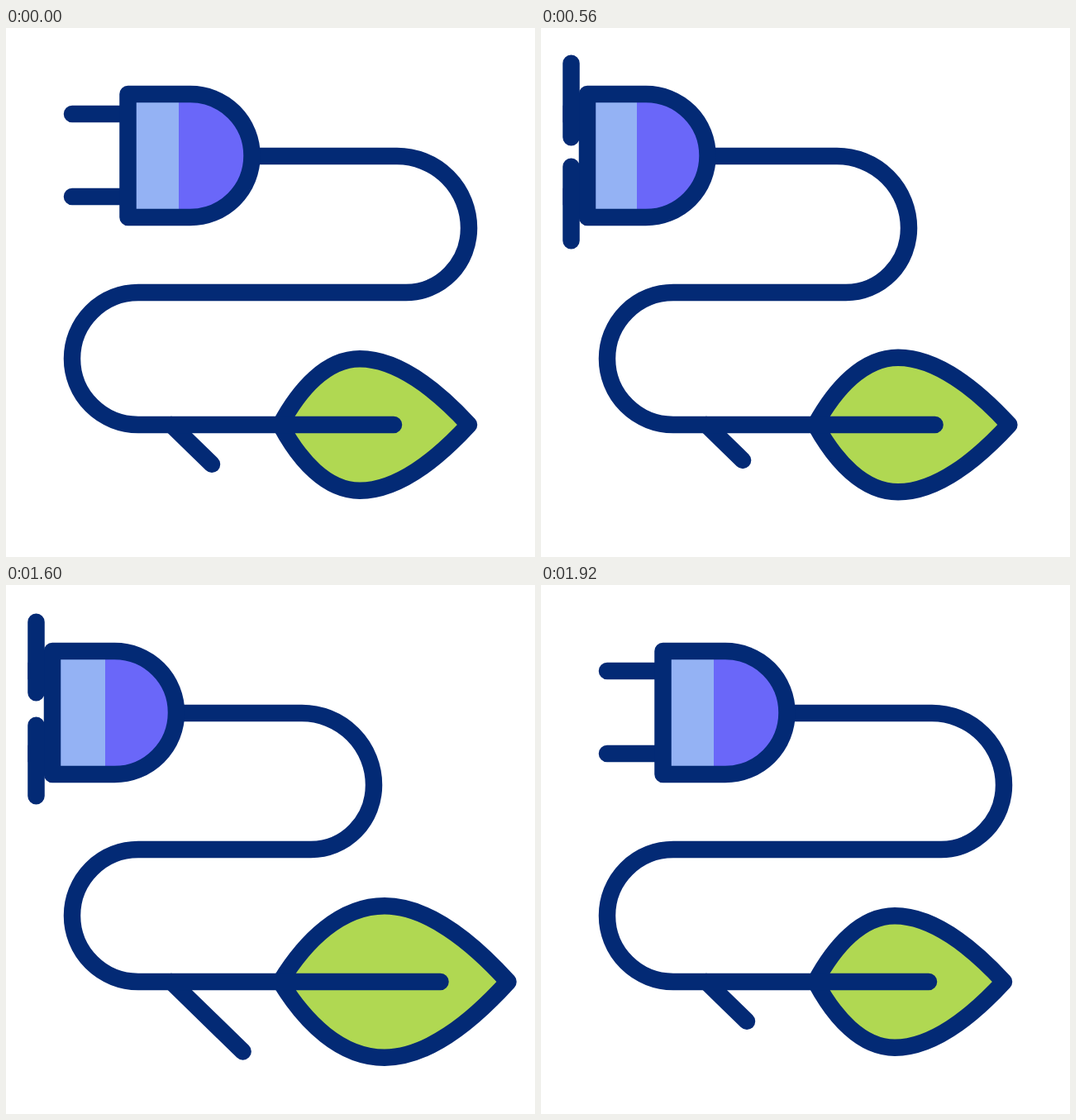
These frames come from a looping animation (640x640 px, 2 s). An HTML page:

```html
<!DOCTYPE html>
<html lang="en">
<head>
<meta charset="utf-8">
<title>Green energy plug</title>
<style>
  html, body { margin: 0; height: 100%; overflow: hidden; background: #fff; }
  svg { display: block; width: 100vw; height: 100vh; }
  .line { fill: none; stroke: #032a75; stroke-width: 20.5; stroke-linecap: round; stroke-linejoin: round; }
</style>
</head>
<body>
<svg viewBox="0 0 640 640">
  <clipPath id="socket"><path d="M26.5 0H640V640H26.5Z"/></clipPath>
  <path id="leaf" class="line" style="fill:#b0d852"/>
  <path id="branch" class="line"/>
  <path id="cable" class="line"/>
  <g clip-path="url(#socket)"><path id="prongs" class="line"/></g>
  <path id="body" fill="#6a67f9"/>
  <path id="band" fill="#94b2f4"/>
  <path id="shell" class="line"/>
  <path id="wall" class="line"/>
</svg>
<script>
const LOOP = 2000;
const smooth = u => u * u * (3 - 2 * u);
const easeIn = u => u * u;
const easeOut = u => Math.sin(u * Math.PI / 2);

// Each key is [time, value, easing towards this key].
const track = (...keys) => t => {
  const next = keys.findIndex(k => k[0] > t);
  if (next === 0) return keys[0][1];
  if (next < 0) return keys[keys.length - 1][1];
  const [t0, v0] = keys[next - 1];
  const [t1, v1, ease = smooth] = keys[next];
  return v0 + (v1 - v0) * ease((t - t0) / (t1 - t0));
};

const plugX = track([40, 147.5], [320, 153.1], [530, 56, easeIn], [1600, 56], [1920, 147.5]);
const plugWidth = track([40, 75.5], [320, 79.9], [520, 75.5], [560, 71], [600, 75.5]);
const bandWidth = track([40, 61.5], [320, 66], [520, 64], [560, 60], [600, 64], [1600, 64], [1920, 61.5]);
const rightBend = track([40, 560], [320, 566.3], [530, 445, easeIn], [1600, 445], [1920, 560]);
const leftBend = track([40, 80], [320, 89.4], [530, 80]);
const leafGrowth = track([520, 0], [1000, 1, easeOut], [1600, 1], [1920, 0]);
const branchSize = track([40, 49], [320, 41], [480, 41], [1000, 88], [1560, 88], [1920, 49]);
const wallHalf = track([40, 0], [240, 44.7], [1560, 44.7], [1880, 0]);

const draw = (id, d) => document.getElementById(id).setAttribute('d', d);

function render(t) {
  const x = plugX(t), w = plugWidth(t), split = x + bandWidth(t);
  const shell = `M${x} 80H${x + w}A74.5 74.5 0 0 1 ${x + w} 229H${x}Z`;
  draw('body', shell);
  draw('shell', shell);
  draw('band', `M${x} 80H${split}V229H${x}Z`);
  draw('prongs', `M${x - 67.5} 104H${x}M${x - 67.5} 204H${x}`);

  const g = leafGrowth(t);
  const r = rightBend(t), l = leftBend(t) + 80;
  draw('cable', `M${x + w + 74.5} 155H${r - 87}A87 87 0 0 1 ${r} 242A76 78 0 0 1 ${r - 76} 320` +
    `H${l}A80 80 0 0 0 ${l} 480H${469 + 56.5 * g}`);

  const b = branchSize(t);
  draw('branch', `M200 480l${b} ${b * 0.975}`);

  const left = 332, top = 428 + 30 * g, tip = 560 + 47.5 * g, h = 79.7 + 12 * g;
  const at = (from, to, u) => from + (to - from) * u;
  const side = s => {
    const y = u => 480 + s * h * u;
    return {
      rise: [at(left, top, 0.24), y(0.54), at(left, top, 0.58), y(1)],
      fall: [at(top, tip, 0.34), y(1), at(top, tip, 0.7), y(0.54)]
    };
  };
  const up = side(-1), down = side(1);
  const [a, c, d, e] = down.fall, [i, j, k, m] = down.rise;
  draw('leaf', `M${left} 480C${up.rise} ${top} ${480 - h}C${up.fall} ${tip} 480` +
    `C${[d, e, a, c]} ${top} ${480 + h}C${[k, m, i, j]} ${left} 480Z`);

  const half = wallHalf(t);
  draw('wall', half > 0 ? [87.5, 212.5].map(y => `M36.5 ${y - half}V${y + half}`).join('') : '');
}

function frame() {
  render(performance.now() % LOOP);
  requestAnimationFrame(frame);
}
frame();
</script>
</body>
</html>
```
